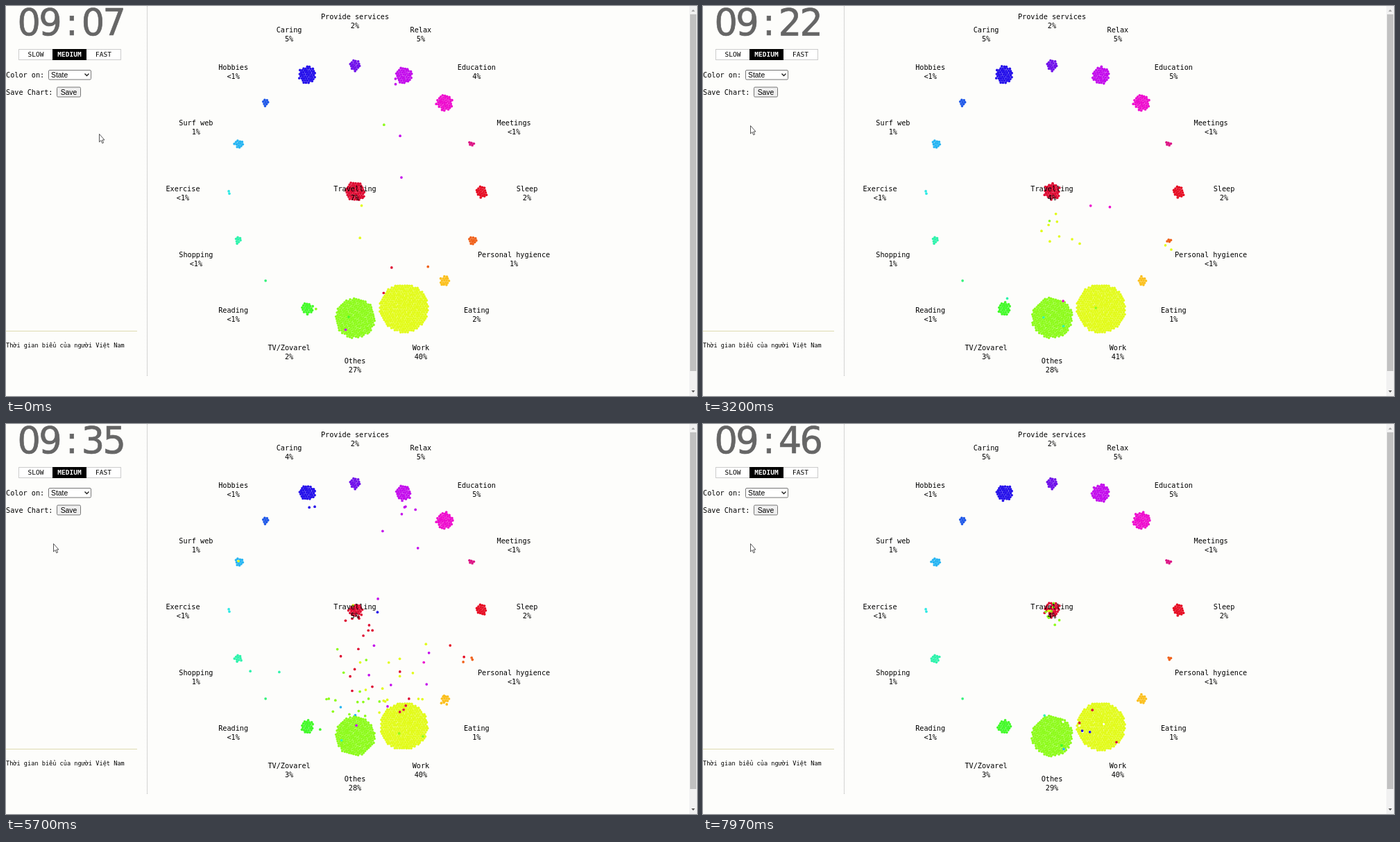
These frames come from a looping animation (996 px wide and 562 px high, 8 s). An HTML page with a canvas:

```html
<!DOCTYPE html>
<html lang="en">
<head>
<meta charset="utf-8">
<title>Daily activities</title>
<style>
  html, body { margin: 0; width: 100%; height: 100%; overflow: hidden; background: #fdfdfb; }
  canvas, svg { position: absolute; left: 0; top: 0; width: 996px; height: 562px; }
  text { font: 10.2px "DejaVu Sans Mono", monospace; fill: #000; }
  .mid { text-anchor: middle; }
  .clock text { font: 52.5px "DejaVu Sans", sans-serif; fill: #666; stroke: #666; stroke-width: .7; text-anchor: middle; }
  .speed text { font-size: 9.5px; text-anchor: middle; }
  .speed .on { fill: #fff; font-weight: bold; }
  .form { font: 10.4px "Liberation Sans", sans-serif; }
  .note { font-size: 8.6px; }
</style>
</head>
<body>
<canvas id="dots" width="996" height="562"></canvas>
<svg viewBox="0 0 996 562">
  <g id="clock" class="clock"></g>
  <path d="M203.5 0V533" stroke="#aaa" stroke-dasharray="1 1"/>
  <g class="speed">
    <rect x="18.5" y="62.5" width="147" height="15" fill="#fff" stroke="#ccc"/>
    <rect x="67" y="62" width="49" height="16"/>
    <text x="43" y="73">SLOW</text>
    <text x="91.5" y="73" class="on">MEDIUM</text>
    <text x="140.5" y="73">FAST</text>
  </g>
  <text x="0" y="102.5">Color on:</text>
  <rect x="61.5" y="92.5" width="61" height="13.5" rx="1.5" fill="#fff" stroke="#777"/>
  <text x="65" y="103" class="form">State</text>
  <path d="M113.5 97.5l3 3 3-3" fill="none" stroke="#222" stroke-width="1.4"/>
  <text x="0" y="127.5">Save Chart:</text>
  <rect x="73.5" y="117" width="34" height="14" rx="1.5" fill="#efefef" stroke="#777"/>
  <text x="90.5" y="128" class="form mid">Save</text>
  <path d="M0 468.5H189" stroke="#dedbb0"/>
  <text x="0" y="491.5" class="note">Thời gian biểu của người Việt Nam</text>
  <g id="labels"></g>
  <rect x="985" width="11" height="562" fill="#f1f1f1"/>
  <rect x="986" y="12" width="9" height="514" fill="#c1c1c1"/>
  <path d="M988 8h5l-2.5-3z" fill="#a3a3a3"/>
  <path d="M988 554h5l-2.5 3z" fill="#505050"/>
  <path id="cursor" d="M.5 .5V12L3 9.6 4.8 13.8 6.6 13 4.8 9H8z" fill="#fff" stroke="#444" stroke-width=".9"/>
</svg>
<script>
const LOOP = 8000, MINUTE = 204.5, FIRST_MINUTE = 7.15;
const CENTER = { x: 503, y: 267 }, RING = 182, LABEL_RING = 248;
const SPACING = 3.35, DOT = 1.85, JITTER = 0.5;
const TRAVEL = 1150, SHIFT = 450;

// key, label, colour, people at the start; clockwise from the right, last one in the middle
const activities = [
  ['S', 'Sleep', '#e60d23', 22],
  ['P', 'Personal hygience', '#f0611a', 13],
  ['E', 'Eating', '#fbbf1c', 17],
  ['W', 'Work', '#e2fb1a', 400],
  ['O', 'Othes', '#8efb1c', 268],
  ['V', 'TV/Zovarel', '#42fa28', 24],
  ['B', 'Reading', '#35f27a', 1],
  ['M', 'Shopping', '#2ff3ac', 8],
  ['X', 'Exercise', '#2fe9e4', 2],
  ['N', 'Surf web', '#27b5f2', 13],
  ['H', 'Hobbies', '#1f58e8', 8],
  ['C', 'Caring', '#2510ea', 50],
  ['A', 'Provide services', '#7010ea', 20],
  ['R', 'Relax', '#c30cec', 50],
  ['D', 'Education', '#ee0cce', 44],
  ['G', 'Meetings', '#dc1284', 5],
  ['T', 'Travelling', '#de0a32', 65]
];

// At each minute: from, to, how many people
const waves = {
  0: 'WR6 OR4 RW6 RO4 WT6 OT4 TW6 TO4 ON3 NO3 WE4 EW4 WP3 PW3',
  5: 'WT2 TW2 OR1 RO1 OV1 VO1',
  10: 'TO18 TW8 WT9 OT8 MT2 OM2 TC1 TR1 CT1 RT1 EO5 EW3 WE3 PO5 RW6 WR3 OR3 OV3 WV1 NW1 PC1 WC3 CO3',
  12: 'TO1 TW5 PE1',
  15: 'WT1 OR1 RW1',
  20: 'TW8 TO1 OM3 PW2 OD3 WO2',
  27: 'WO2 OW2 WT1 TW1 WR1 RW1',
  30: 'WR8 OR4 RO6 RW5 WT15 OT10 TW9 TO9 CO8 CW2 WC2 OC1 ON2 OM2 MO1 WD3 SW2 WS2 WE3 EO2 OV2 OP1 PW2',
  35: 'WT3 TW3 OR2 WO1 OM1 NW1',
  40: 'WT2 TW2 WO1 OW1',
  45: 'TO8 TW2 WT3 WC2 OV1 ON1 OM1'
};

const cursorPath = [[0, 134, 184], [850, 21, 368], [1150, 21, 368], [2000, 68, 173], [2500, 68, 173], [2560, 68, 172]];

let seed = 20;
function random() {
  seed = (seed + 0x6d2b79f5) | 0;
  let n = Math.imul(seed ^ (seed >>> 15), 1 | seed);
  n = (n + Math.imul(n ^ (n >>> 7), 61 | n)) ^ n;
  return ((n ^ (n >>> 14)) >>> 0) / 4294967296;
}
const spread = width => (random() - 0.5) * width;
const clamp = v => Math.max(0, Math.min(1, v));
const smooth = v => v * v * (3 - 2 * v);
const mix = (a, b, k) => a + (b - a) * k;
const minuteStart = minute => (minute - FIRST_MINUTE) * MINUTE;

function addText(parent, x, y, content = '', cls = '') {
  const el = document.createElementNS('http://www.w3.org/2000/svg', 'text');
  el.setAttribute('x', x);
  el.setAttribute('y', y);
  el.setAttribute('class', cls);
  el.textContent = content;
  return parent.appendChild(el);
}
function setText(el, content) {
  if (el.textContent !== content) el.textContent = content;
}

// Slightly loose hexagonal packing ordered from the middle outwards
function packing(x, y) {
  const turn = random() * 0.35, dx = random(), dy = random(), slots = [];
  for (let row = -17; row <= 17; row++) {
    for (let col = -17; col <= 17; col++) {
      const u = (col + (row & 1) / 2) * SPACING, v = row * SPACING * 0.866;
      slots.push({
        x: x + u * Math.cos(turn) - v * Math.sin(turn) + spread(JITTER),
        y: y + u * Math.sin(turn) + v * Math.cos(turn) + spread(JITTER),
        far: Math.hypot(u - dx, v - dy)
      });
    }
  }
  return slots.sort((a, b) => a.far - b.far);
}

const labels = document.getElementById('labels');
const groups = {}, people = [];

activities.forEach(([key, label, color, count], i) => {
  const angle = i * Math.PI / 8, inner = key === 'T' ? 0 : 1;
  const at = r => [CENTER.x + Math.cos(angle) * r * inner, CENTER.y + Math.sin(angle) * r * inner];
  const [lx, ly] = at(LABEL_RING);
  const group = { color, slots: packing(...at(RING)), members: [], counts: [[-Infinity, count]] };
  addText(labels, lx, ly, label, 'mid');
  group.percent = addText(labels, lx, ly + 13, '', 'mid');
  for (let n = 0; n < count; n++) {
    const person = { home: group.slots[n], color, moves: [] };
    group.members.push(person);
    people.push(person);
  }
  groups[key] = group;
});

function send(person, group, slot, start, travels) {
  person.moves.push({
    start, travels,
    to: group.slots[slot],
    color: group.color,
    length: travels ? TRAVEL : SHIFT,
    bowX: travels ? spread(60) : 0,
    bowY: travels ? spread(40) : 0
  });
}

for (const [minute, flows] of Object.entries(waves)) {
  const start = minuteStart(+minute), arrivals = [];
  for (const flow of flows.split(' ')) {
    const source = groups[flow[0]].members;
    const crowded = source.length > 200;
    for (let n = +flow.slice(2); n > 0; n--) {
      let i;
      do i = Math.floor(random() * source.length); while (!source[i]);
      // It takes longer to push through a crowd
      const delay = crowded ? 1000 * random() ** 3 : 300 * random();
      arrivals.push({ person: source[i], group: groups[flow[1]], leave: start + delay });
      source[i] = null;
    }
  }
  // The outermost people close the gaps, then newcomers join the rim
  for (const group of Object.values(groups)) {
    const list = group.members;
    for (let i = 0; i < list.length; i++) {
      while (list.length > i && !list[i]) {
        const last = list.pop();
        if (last && i < list.length) {
          list[i] = last;
          send(last, group, i, start, false);
        }
      }
    }
  }
  arrivals.sort((a, b) => a.leave - b.leave);
  for (const { person, group, leave } of arrivals) {
    send(person, group, group.members.length, start, true);
    person.moves[person.moves.length - 1].leave = leave;
    group.members.push(person);
  }
  for (const group of Object.values(groups)) group.counts.push([start, group.members.length]);
}

function locate(person, t) {
  let { x, y } = person.home, { color } = person, moving = false;
  for (const move of person.moves) {
    if (move.start > t) break;
    const k = smooth(clamp((t - (move.leave ?? move.start)) / move.length));
    const bow = Math.sin(k * Math.PI);
    x = mix(x, move.to.x, k) + move.bowX * bow;
    y = mix(y, move.to.y, k) + move.bowY * bow;
    color = move.color;
    moving = move.travels && k < 1;
  }
  return { x, y, color, moving };
}

const ctx = document.getElementById('dots').getContext('2d');
function drawDots(t) {
  ctx.clearRect(0, 0, 996, 562);
  const spots = people.map(person => locate(person, t));
  for (const layer of [false, true]) {
    for (const { x, y, color, moving } of spots) {
      if (moving !== layer) continue;
      ctx.fillStyle = color;
      ctx.beginPath();
      ctx.arc(x, y, DOT, 0, 2 * Math.PI);
      ctx.fill();
    }
  }
}

const clock = document.getElementById('clock');
const digits = [...'09:07'].map((char, i) => addText(clock, 33.3 + i * 30.75, 41.5, char));
const cursor = document.getElementById('cursor');

function moveCursor(t) {
  let i = cursorPath.length - 1;
  while (cursorPath[i][0] > t) i--;
  const [t0, x0, y0] = cursorPath[i];
  const [t1, x1, y1] = cursorPath[i + 1] || [LOOP, x0, y0];
  const k = smooth(clamp((t - t0) / (t1 - t0)));
  cursor.setAttribute('transform', `translate(${mix(x0, x1, k)} ${mix(y0, y1, k)})`);
}

function render() {
  const t = performance.now() % LOOP;
  const minute = String(Math.floor(FIRST_MINUTE + t / MINUTE)).padStart(2, '0');
  [...('09:' + minute)].forEach((char, i) => setText(digits[i], char));
  for (const { counts, percent } of Object.values(groups)) {
    const count = counts.filter(([start]) => start <= t).pop()[1];
    setText(percent, count < 10 ? '<1%' : Math.round(count / 10) + '%');
  }
  drawDots(t);
  moveCursor(t);
  requestAnimationFrame(render);
}
render();
</script>
</body>
</html>
```
